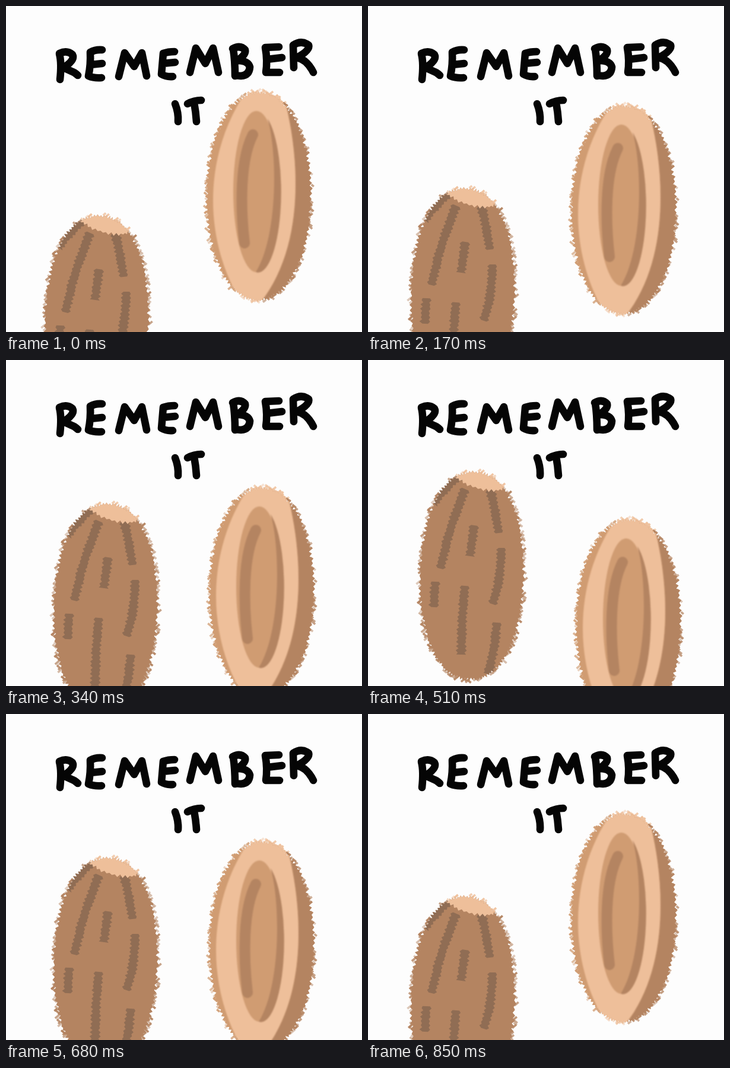
An HTML page that plays this animation: 600x550 px, repeating every 1.02 s.

```html
<!DOCTYPE html>
<html lang="en">
<head>
<meta charset="utf-8">
<title>Remember it</title>
<style>
  html, body { margin: 0; width: 100%; height: 100%; overflow: hidden; background: #fdfdfd; }
  svg { display: block; }
  .ink { fill: none; stroke: #050505; stroke-width: 12.6; stroke-linecap: round; stroke-linejoin: round; }
  .soft { filter: blur(0.8px); }
</style>
</head>
<body>
<svg id="stage" width="600" height="550" viewBox="0 0 600 550">
  <g class="ink" role="img" aria-label="REMEMBER IT">
    <path d="M90 81Q94 96 91 124M90 80Q103 74 112 82Q117 91 97 104L110 110Q116 112 121 117"/>
    <path d="M162 74Q151 73 142 78Q143 99 139 118Q148 122 161 121M143 99L162 97"/>
    <path d="M190 119L200 79L216 102L229 79L237 118"/>
    <path d="M284 77Q273 77 265 80L262 115Q270 120 281 119M264 97L285 95"/>
    <path d="M310 112L320 71L336 97L349 71L358 112"/>
    <path d="M383 73Q386 92 386 118M382 72Q395 65 403 74Q405 82 390 92Q408 92 411 103Q410 117 396 118L386 117"/>
    <path d="M460 69L437 70Q441 92 438 112L461 112M440 90L465 87"/>
    <path d="M484 67L485 104M484 66Q498 57 510 66Q513 75 490 87Q507 90 518 112"/>
    <path d="M285 165Q291 180 290 195M306 165Q317 159 329 159M317 163Q320 179 321 195"/>
  </g>
</svg>
<script>
const NS = 'http://www.w3.org/2000/svg';
const stage = document.getElementById('stage');
const PEACH = '#eebf9a', TAN = '#d09c72', BROWN = '#b48461', DARK = '#906d54';

let seed = 7;
function rand() {
  seed = (seed * 16807) % 2147483647;
  return seed / 2147483647;
}

function add(parent, tag, attrs) {
  const el = document.createElementNS(NS, tag);
  for (const k in attrs) el.setAttribute(k, attrs[k]);
  parent.appendChild(el);
  return el;
}

// Superellipse as evenly spaced points with outward normals
function oval(cx, cy, rx, ry, power = 2, lean = 0) {
  const n = Math.round((rx + ry) * Math.PI / 3.2 / 2) * 2;
  const bend = v => Math.sign(v) * Math.abs(v) ** (2 / power);
  return Array.from({ length: n }, (_, i) => {
    const a = i / n * 2 * Math.PI;
    const u = bend(Math.cos(a)), v = bend(Math.sin(a));
    const h = Math.hypot(u / rx, v / ry);
    return { x: cx + rx * u - lean * v, y: cy + ry * v, nx: u / rx / h, ny: v / ry / h };
  });
}

// Points with normals along a path
function sample(d, gap) {
  const path = document.createElementNS(NS, 'path');
  path.setAttribute('d', d);
  const len = path.getTotalLength(), n = Math.round(len / gap);
  return Array.from({ length: n + 1 }, (_, i) => {
    const s = len * i / n;
    const q = path.getPointAtLength(s);
    const a = path.getPointAtLength(Math.max(0, s - 1));
    const b = path.getPointAtLength(Math.min(len, s + 1));
    const h = Math.hypot(b.x - a.x, b.y - a.y) || 1;
    return { x: q.x, y: q.y, nx: (b.y - a.y) / h, ny: (a.x - b.x) / h };
  });
}

const shift = (q, r) => [(q.x + q.nx * r).toFixed(1), (q.y + q.ny * r).toFixed(1)];
const zigzag = i => (i % 2 ? 1 : -1) * (0.6 + rand() * 2.6);
const jagged = pts => pts.map((q, i) => shift(q, zigzag(i))).join(' ');

function roughStroke(parent, d, width = 14) {
  const pts = sample(d, 3.5);
  const side = sign => pts.map((q, i) => shift(q, sign * (width / 2 + zigzag(i) * 0.8)));
  add(parent, 'polygon', { points: [...side(1), ...side(-1).reverse()].join(' '), fill: DARK });
}

// Stray flecks left by the brush along an edge
function flecks(parent, pts, tint) {
  for (const q of pts) {
    if (rand() < 0.5) continue;
    const [x, y] = shift(q, rand() * 5 - 1.5);
    const w = 5 + rand() * 5, turn = rand() < 0.5 ? 40 : -40;
    add(parent, 'rect', {
      x: -w / 2, y: -1.8, width: w, height: 3.6, fill: tint(q.x, q.y),
      opacity: (0.4 + rand() * 0.6).toFixed(2),
      transform: `translate(${x} ${y}) rotate(${turn})`
    });
  }
}

function nut(id, edge, base, tint) {
  const group = add(stage, 'g', {});
  const clip = add(group, 'clipPath', { id });
  add(clip, 'polygon', { points: jagged(edge) });
  flecks(group, edge, tint);
  const body = add(group, 'g', { 'clip-path': `url(#${id})` });
  add(body, 'rect', { width: 600, height: 600, fill: base });
  return { group, body };
}

function shellNut() {
  const tint = (x, y) => x > 150 && x < 228 && y < 220 ? PEACH : BROWN;
  const { group, body } = nut('shell', oval(175, 364, 87, 175, 2.2, 3), BROWN, tint);
  [
    'M156 194Q130 214 110 242',
    'M164 218Q146 260 133 306L122 352',
    'M206 218Q215 255 220 292',
    'M179 279L172 331',
    'M225 317Q224 370 210 412',
    'M113 374L111 417',
    'M163 381Q158 440 157 497',
    'M217 443Q214 490 202 530'
  ].forEach(d => roughStroke(body, d));
  add(body, 'polygon', { points: jagged(oval(190, 200, 45, 17)), fill: PEACH, transform: 'rotate(15 190 200)' });
  return group;
}

function openNut() {
  const tint = (x, y) => {
    if (y < 321 ? x > 404 && x < 469 : x > 396 && x < 432) return PEACH;
    return x < 426 ? TAN : BROWN;
  };
  const { group, body } = nut('open', oval(426, 321, 88, 175, 2.05, 1), TAN, tint);
  const soft = add(body, 'g', { class: 'soft' });
  const shape = (d, fill) => add(soft, 'path', { d, fill });
  const rim = 'C492 230 512 400 425 505';
  shape(`M464 138${rim}H560V138Z`, BROWN);
  shape(`M409 138C329 250 332 400 400 505H425C512 400 492 230 464 138Z`, PEACH);
  add(soft, 'ellipse', { cx: 422, cy: 313, rx: 39, ry: 136, fill: TAN });
  shape('M441 190C458 250 458 390 421 449A39 136 0 0 0 441 190Z', BROWN);
  add(soft, 'path', {
    d: 'M416 217C394 260 395 340 402 400', fill: 'none',
    stroke: BROWN, 'stroke-width': 18, 'stroke-linecap': 'round'
  });
  return group;
}

const shell = shellNut(), open = openNut();
const STEP = 170;
const shellPose = [[-22, 165], [-15, 119], [-7, 54], [0, 0]];
const openPose = [[0, 0], [5, 23], [5, 70], [13, 124]];

// Poses run 0 1 2 3 2 1 and repeat
function draw(t) {
  const pose = 3 - Math.abs(3 - Math.floor(t / STEP) % 6);
  shell.setAttribute('transform', `translate(${shellPose[pose]})`);
  open.setAttribute('transform', `translate(${openPose[pose]})`);
}

function tick() {
  draw(performance.now());
  requestAnimationFrame(tick);
}
tick();
</script>
</body>
</html>
```
